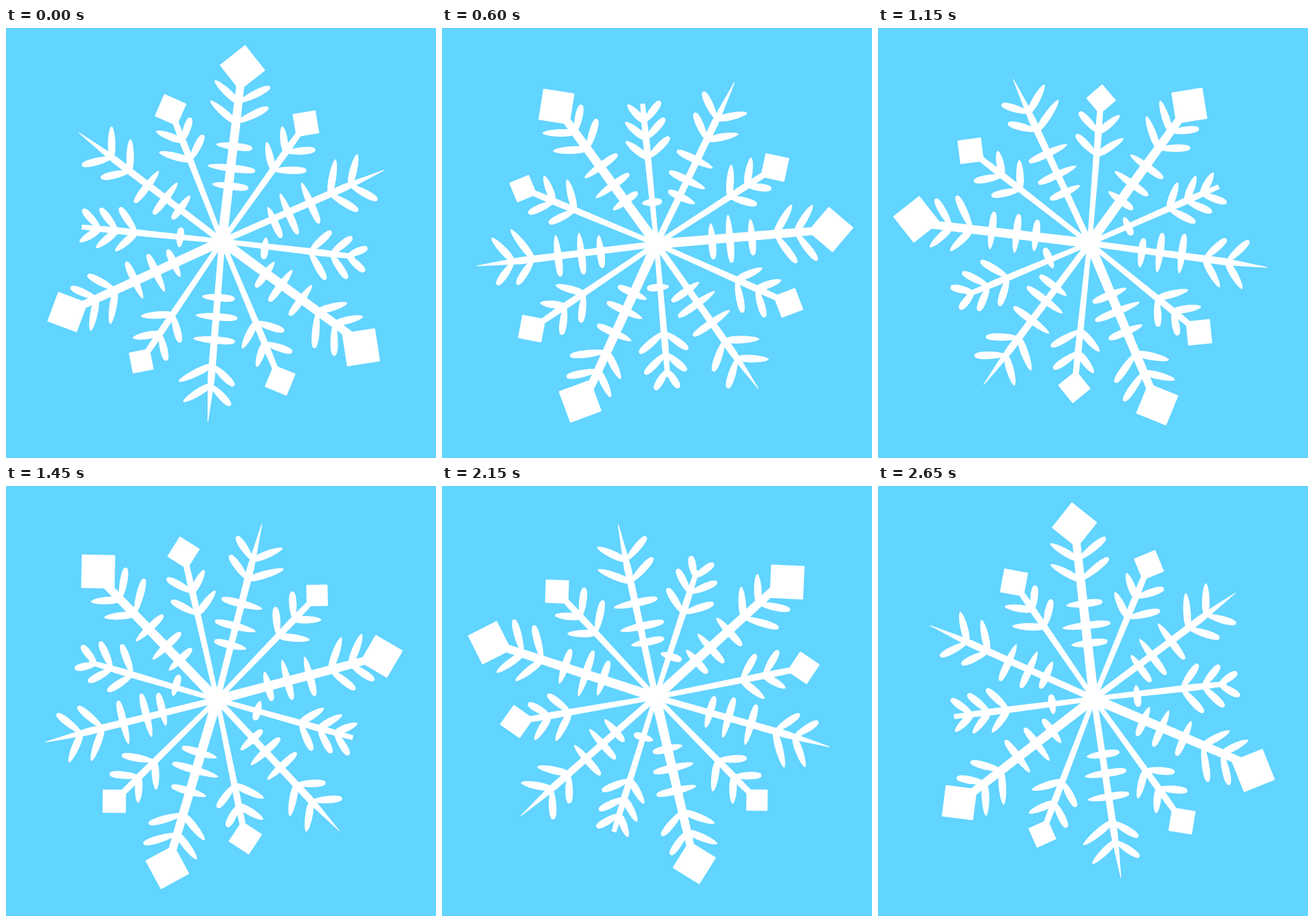
Animation of 625x625 px, one loop 2750 ms. Source, as an HTML page with a canvas:

```html
<!DOCTYPE html>
<html lang="en">
<head>
<meta charset="utf-8">
<title>Snowflake</title>
<style>
  html, body { margin: 0; height: 100%; overflow: hidden; background: #61d4ff; }
  canvas { display: block; width: 100vw; height: 100vh; }
</style>
</head>
<body>
<canvas id="stage" width="625" height="625"></canvas>
<script>
const ctx = document.getElementById('stage').getContext('2d');
const LOOP = 2750, STEP = 50, STEPS = 55;
const RAD = Math.PI / 180;

// Half-widths of a shaft at the centre, at three quarters and at the end.
const SHAFT = { big: [7, 6.3, 5.5], spike: [4.5, 5.3, 0.5], small: [3.5, 5, 4], leafy: [3.5, 5, 3.5] };

// bars and twigs: distance from the centre, reach to left and right.
// thick: the side where the brush strokes end thick (-1 left, 1 right, 0 both).
const arms = [
  { kind: 'big', angle: 6.7, length: 254, gem: 32, thick: 1,
    bars: [[139, 25, 28], [107, 34, 36], [81, 24, 29]], twigs: [[203, 38, 43], [173, 41, 44]] },
  { kind: 'small', angle: 35.5, length: 210, gem: 22.5, thick: 1,
    twigs: [[159, 26, 33], [127, 31, 40]] },
  { kind: 'spike', angle: 66.3, length: 257, thick: 1,
    bars: [[140, 32, 33], [105, 30, 35], [81, 19, 30]], twigs: [[203, 37, 36], [171, 43, 39]] },
  { kind: 'leafy', angle: 96.6, length: 194, thick: 0,
    bars: [[63, 13, 19]], twigs: [[183, 15, 20], [159, 28, 33], [128, 33, 38]] },
  { kind: 'big', angle: 126.2, length: 254, gem: 33, shift: 5, thick: 1,
    bars: [[143, 26, 29], [107, 27, 30], [79, 21, 25]], twigs: [[202, 33, 38], [172, 35, 46]] },
  { kind: 'small', angle: 157.3, length: 219, gem: 23, thick: -1,
    twigs: [[160, 32, 24], [127, 33, 33]] },
  { kind: 'spike', angle: 184.5, length: 263, thick: -1,
    bars: [[144, 30, 31], [110, 31, 30], [82, 25, 23]], twigs: [[209, 31, 38], [180, 34, 47]] },
  { kind: 'small', angle: 214, length: 210, gem: 20.5, thick: -1,
    twigs: [[161, 30, 29], [128, 32, 37]] },
  { kind: 'big', angle: 245.4, length: 247, gem: 31, thick: 1,
    bars: [[139, 28, 31], [106, 32, 28], [77, 22, 22]], twigs: [[200, 39, 31], [170, 42, 37]] },
  { kind: 'leafy', angle: 275.8, length: 205, thick: 1,
    bars: [[61, 15, 14]], twigs: [[178, 22, 26], [153, 28, 30], [125, 30, 34]] },
  { kind: 'spike', angle: 307.2, length: 261, thick: -1,
    bars: [[135, 32, 26], [103, 29, 29], [77, 18, 25]], twigs: [[201, 35, 36], [168, 33, 38]] },
  { kind: 'small', angle: 338.6, length: 205, gem: 23.5, thick: 1,
    twigs: [[156, 31, 23], [126, 38, 31]] },
];

function polygon(points) {
  ctx.beginPath();
  points.forEach(([x, y]) => ctx.lineTo(x, y));
  ctx.closePath();
  ctx.fill();
}

// Brush stroke that starts narrow at (x1, y1) and ends blunt at (x2, y2).
function stroke(x1, y1, x2, y2) {
  const length = Math.hypot(x2 - x1, y2 - y1);
  ctx.save();
  ctx.translate(x1, y1);
  ctx.rotate(Math.atan2(y2 - y1, x2 - x1));
  ctx.beginPath();
  ctx.moveTo(0, 0);
  ctx.bezierCurveTo(length * 0.05, -6, length * 1.05, -8.5, length, 0);
  ctx.bezierCurveTo(length * 1.05, 8.5, length * 0.05, 6, 0, 0);
  ctx.fill();
  ctx.restore();
}

function twig([at, left, right], thick) {
  const tip = -at - 28;
  if (thick === 1) stroke(-left, tip, 0, -at);
  else stroke(0, -at, -left, tip);
  if (thick === -1) stroke(right, tip, 0, -at);
  else stroke(0, -at, right, tip);
}

function bar([at, left, right], thick) {
  if (thick < 0) stroke(right, -at, -left, -at);
  else stroke(-left, -at, right, -at);
}

function drawGem(x, y, r) {
  polygon([[x, y - r], [x + r, y], [x, y + r], [x - r, y]]);
  ctx.stroke();
}

function drawArm({ kind, angle, length, gem, shift = 0, thick, bars = [], twigs }) {
  const [a, b, c] = SHAFT[kind], bend = -0.75 * length;
  ctx.save();
  ctx.rotate(angle * RAD);
  polygon([[-a, 0], [-b, bend], [-c, -length], [c, -length], [b, bend], [a, 0]]);
  bars.forEach(t => bar(t, thick));
  twigs.forEach(t => twig(t, thick));
  if (gem) drawGem(shift, -length, gem);
  ctx.restore();
}

function draw(now) {
  const step = Math.min(Math.floor(now % LOOP / STEP), STEPS - 2);
  ctx.fillStyle = '#61d4ff';
  ctx.fillRect(0, 0, 625, 625);
  ctx.fillStyle = ctx.strokeStyle = '#fff';
  ctx.lineWidth = 2;
  ctx.lineJoin = 'round';
  ctx.save();
  ctx.translate(310.4, 310.6);
  ctx.rotate(step * 2 * Math.PI / STEPS);
  ctx.translate(3.6, -0.6);
  arms.forEach(drawArm);
  ctx.beginPath();
  ctx.arc(0, 0, 10, 0, 2 * Math.PI);
  ctx.fill();
  ctx.restore();
}

const start = performance.now();
function loop() {
  draw(performance.now() - start);
  requestAnimationFrame(loop);
}
loop();
</script>
</body>
</html>
```
